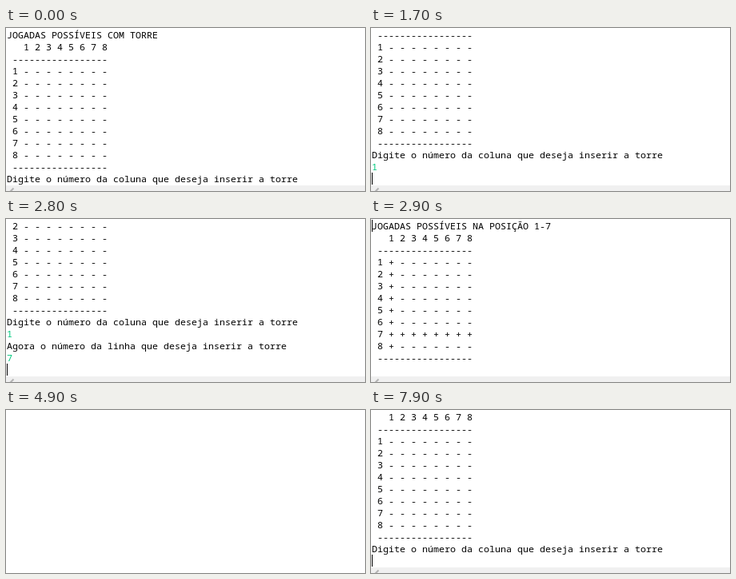
An HTML page with a canvas for the animation above (8000 ms loop, 449x204 px).

```html
<!DOCTYPE html>
<html lang="pt">
<head>
<meta charset="utf-8">
<style>
html, body { margin: 0; width: 100%; height: 100%; overflow: hidden; background: #fff; }
canvas { display: block; }
</style>
</head>
<body>
<canvas id="stage" width="449" height="204"></canvas>
<script>
const ctx = document.getElementById('stage').getContext('2d');
const LOOP = 8000, CELL = 7, LINE = 15, LEFT = 1, BASE = 13;
const INPUT = '#00c87d';

const RULE = ' ' + '-'.repeat(17);
const DIGITS = [1, 2, 3, 4, 5, 6, 7, 8];

function board(title, col, row) {
  const rows = DIGITS.map(r =>
    ` ${r} ` + DIGITS.map(c => (c === col || r === row ? '+' : '-')).join(' '));
  return [title, '   ' + DIGITS.join(' '), RULE, ...rows, RULE];
}

const askColumn = [
  ...board('JOGADAS POSSÍVEIS COM TORRE'),
  'Digite o número da coluna que deseja inserir a torre'
];
const askRow = [...askColumn, '>1', 'Agora o número da linha que deseja inserir a torre'];
const result = board('JOGADAS POSSÍVEIS NA POSIÇÃO 1-7', 1, 7);

// Each step: start time, console lines, first visible line, caret [column, row]
const steps = [
  [0, askColumn, 0],
  [600, askColumn, 0, [52, 12]],
  [1100, askColumn, 0],
  [1400, [...askColumn, '>1'], 1, [1, 12]],
  [1700, [...askColumn, '>1'], 2, [0, 12]],
  [1800, askRow, 3, [0, 11]],
  [2300, askRow, 3],
  [2500, [...askRow, '>7'], 3, [1, 12]],
  [2800, [...askRow, '>7'], 4, [0, 12]],
  [2900, result, 0, [0, 0]],
  [3400, result, 0],
  [3900, result, 0, [0, 0]],
  [4400, result, 0],
  [4900, null],
  [6000, askColumn, 1],
  [6900, askColumn, 1, [0, 12]],
  [7500, askColumn, 1],
  [7900, askColumn, 1, [0, 12]]
];

function drawLine(line, row) {
  const typed = line[0] === '>';
  ctx.fillStyle = typed ? INPUT : '#000';
  [...(typed ? line.slice(1) : line)].forEach((ch, i) => {
    if (ch !== ' ') ctx.fillText(ch, LEFT + i * CELL, BASE + row * LINE);
  });
}

function drawScrollbar() {
  ctx.fillStyle = '#f0f0f0';
  ctx.fillRect(0, 197, 449, 7);
  ctx.strokeStyle = '#b4b4b4';
  ctx.lineWidth = 2;
  ctx.beginPath();
  ctx.moveTo(9.5, 200.5);
  ctx.lineTo(5, 205);
  ctx.stroke();
}

function draw(now) {
  const t = now % LOOP;
  const [, lines, top, caret] = steps.findLast(s => s[0] <= t);
  ctx.fillStyle = '#fff';
  ctx.fillRect(0, 0, 449, 204);
  if (lines) {
    ctx.font = '11.667px "Noto Sans Mono", "DejaVu Sans Mono", monospace';
    lines.slice(top, top + 13).forEach(drawLine);
    drawScrollbar();
    if (caret) {
      ctx.fillStyle = '#000';
      ctx.fillRect(LEFT + caret[0] * CELL, 1 + caret[1] * LINE, 1, LINE);
    }
  }
}

const start = performance.now();
function tick() {
  draw(performance.now() - start);
  requestAnimationFrame(tick);
}
tick();
</script>
</body>
</html>
```
